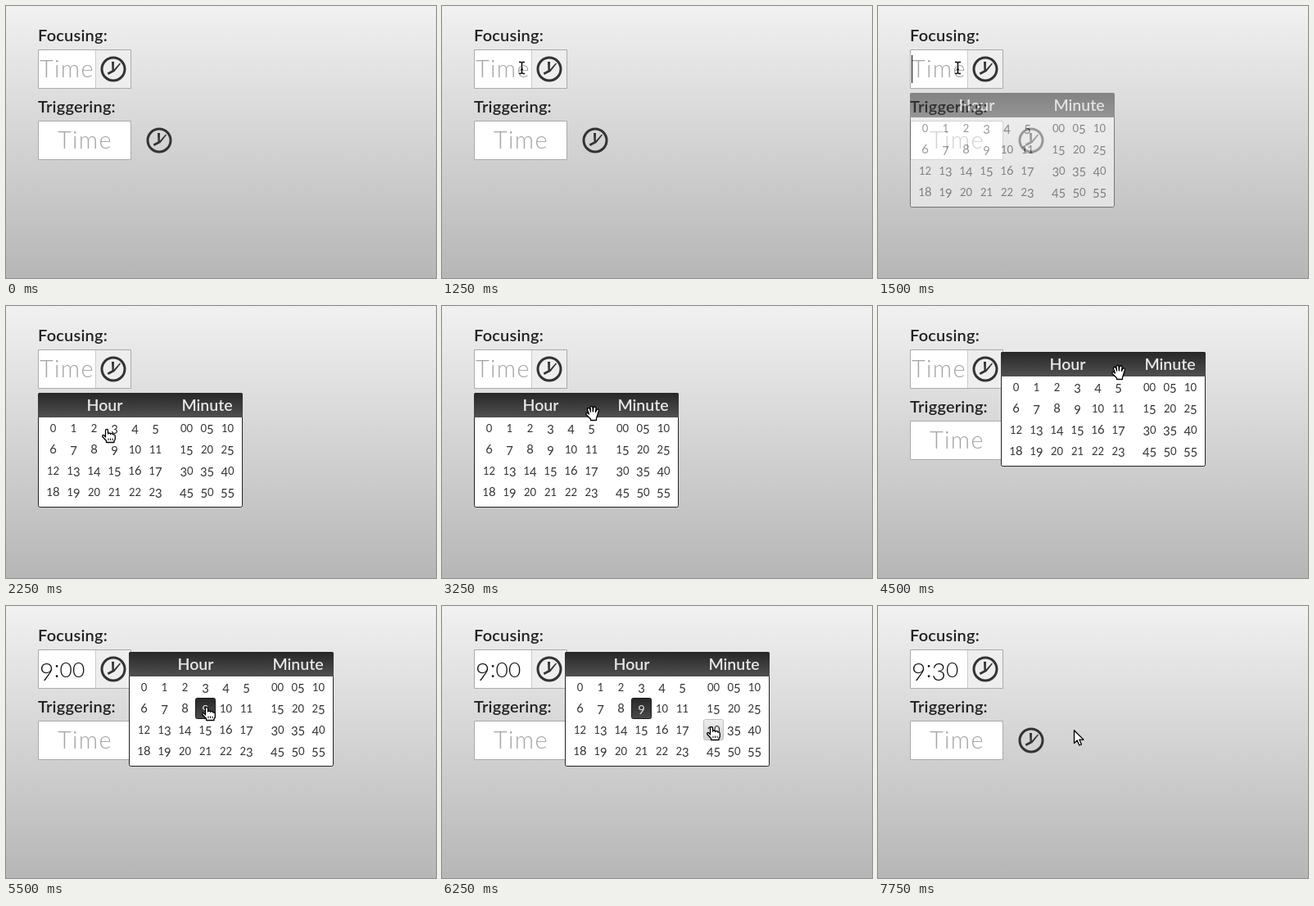
These frames come from a looping animation (525 by 332 pixels, 8000 ms). An HTML page with a canvas:

```html
<!DOCTYPE html>
<html lang="en">
<head>
<meta charset="utf-8">
<title>Time picker</title>
<style>
  html, body { margin: 0; width: 100%; height: 100%; overflow: hidden; }
  canvas { display: block; }
</style>
</head>
<body>
<canvas id="stage" width="525" height="332"></canvas>
<script>
const ctx = document.getElementById('stage').getContext('2d');
const LOOP = 8000;
const FONT = 'Lato, "Open Sans", sans-serif';

// Each row: start time, then the state that holds until the next row.
const CURSORS = [
  [0, null], [250, 'point', 213, 151], [500, 'arrow', 176, 89], [750, 'arrow', 134, 75],
  [1250, 'beam', 93, 67], [2250, 'point', 117, 150], [2500, 'point', 132, 199],
  [2750, 'point', 163, 147], [3000, 'open', 175, 122], [3750, 'closed', 222, 110],
  [4000, 'closed', 274, 79], [4250, 'closed', 288, 71], [4500, 'open', 285, 72],
  [4750, 'point', 270, 85], [5000, 'point', 242, 117], [5250, 'point', 239, 123],
  [5750, 'point', 299, 155], [6000, 'point', 315, 152], [6250, 'point', 323, 147],
  [7750, 'arrow', 239, 151]
];
const POPUPS = [
  [0, 0, 39, 106], [1500, .5, 39, 106], [1750, 1, 39, 106], [3750, .85, 84, 95],
  [4000, .85, 136, 64], [4250, .85, 150, 56], [4500, 1, 150, 56], [7000, 0, 150, 56]
];
const HOVERS = [
  [0, ''], [2500, 'h15'], [2750, 'h4'], [3000, ''], [5000, 'h9'], [5750, 'h17'], [6000, 'm30']
];
const VALUES = [[0, ''], [5500, '9:00'], [7000, '9:30']];
const CARET = [[0, false], [1500, true], [2250, false], [2750, true], [3250, false]];

const SHAPES = {
  arrow: new Path2D('M.5 .8V16.5L4.2 13 6.8 19 9.4 17.9 6.9 12.1H12Z'),
  point: new Path2D('M4.5 10V2Q4.5 .5 6 .5T7.5 2V6Q7.5 5 9 5T10.7 6.5Q10.7 5.5 12.2 5.7T13.8 7Q16.3 6.5 16.3 9V12Q16.3 13.5 15 14.5V16.5H5.5V14.5Q3 12 .8 9.5Q.3 7.5 2 7.5Q3.5 7.8 4.5 10Z'),
  open: new Path2D('M4.5 10L2.5 4.5Q2.3 2.5 4 2.5T6 5L6.5 7 6 2Q6 .5 7.5 .5T9 2L9.3 7 10 2Q10.5 .8 11.7 1T13 2.8L12.5 7.5 14 4.5Q15 3.5 16 4.3T16 7L14.5 12Q14 14 13.5 15.5V17.5H6.5V16Q4 13.5 1 10.5Q.2 8.5 2 8.5Q3 8.6 4.5 10Z'),
  closed: new Path2D('M3.5 7Q3 2 5 2Q6 2 6.2 2.7Q6.5 .7 8 .7T9.8 2Q10.5 1 11.7 1.3T13 3Q15.5 2.5 15.5 5.5V8.5Q15 10.5 14 12V14H5.5V12.5Q3 10 1 8Q.5 6.5 1.8 6.3Z'),
  beam: new Path2D('M1 1.5H3.3L4.5 2.5 5.7 1.5H8M1 15.5H3.3L4.5 14.5 5.7 15.5H8M4.5 2.5V14.5M3 10.5H6')
};
const FINGERS = new Path2D('M8 11.5V14M10.5 11.5V14M13 11.5V14');

const stateAt = (rows, time) => rows.findLast(row => row[0] <= time).slice(1);

function shade(y, height, top, bottom) {
  const gradient = ctx.createLinearGradient(0, y, 0, y + height);
  gradient.addColorStop(0, top);
  gradient.addColorStop(1, bottom);
  return gradient;
}

function box(x, y, w, h, fill, border, radius = 0) {
  ctx.beginPath();
  ctx.roundRect(x + .5, y + .5, w - 1, h - 1, radius);
  ctx.fillStyle = fill;
  ctx.fill();
  ctx.strokeStyle = border;
  ctx.lineWidth = 1;
  ctx.stroke();
}

function text(string, x, y, size, color, { weight = 400, align = 'left', spacing = 0 } = {}) {
  ctx.font = `${weight} ${size}px ${FONT}`;
  ctx.textAlign = align;
  ctx.letterSpacing = spacing + 'px';
  ctx.fillStyle = color;
  ctx.fillText(string, x, y);
  ctx.letterSpacing = '0px';
}

// Old-style figures: 0-2 are shorter, 3 4 5 7 9 hang below the baseline.
function figures(string, x, y, size, color, { weight = 400, centered = false } = {}) {
  const glyphs = [...string].map(char => {
    const scaled = '012'.includes(char) ? size * .88 : size;
    ctx.font = `${weight} ${scaled}px ${FONT}`;
    return { char, scaled, width: ctx.measureText(char).width, drop: '34579'.includes(char) ? size * .12 : 0 };
  });
  if (centered) x -= glyphs.reduce((sum, g) => sum + g.width, 0) / 2;
  for (const g of glyphs) {
    text(g.char, x, y + g.drop, g.scaled, color, { weight });
    x += g.width;
  }
}

function clock(x, y) {
  ctx.save();
  ctx.translate(x, y);
  ctx.strokeStyle = ctx.fillStyle = '#333';
  ctx.lineWidth = 3;
  ctx.beginPath();
  ctx.arc(0, 0, 14, 0, 7);
  ctx.stroke();
  ctx.fill(new Path2D('M-2 -9H1L.8 .5 8 -7.5 9 -6.5 1.5 3 -6 7 -7.3 4.5 -1.5 1.5Z'));
  ctx.restore();
}

function cell(id, label, x, y, hovered, selected) {
  const dark = id === selected;
  if (dark) box(x, y, 25, 26, shade(y, 26, '#272727', '#4c4c4c'), '#1a1a1a', 2);
  else if (id === hovered) box(x, y, 25, 26, shade(y, 26, '#eee', '#d2d2d2'), '#c0c0c0', 2);
  figures(label, x + 12.5, y + 18, 14.8, dark ? '#ddd' : '#333', { centered: true });
}

function popup(opacity, x, y, hovered, selected) {
  // Blended with a copy of the page so the panel fades as one layer.
  const page = opacity < 1 ? ctx.getImageData(x, y, 250, 140) : null;
  const heading = { weight: 600, align: 'center' };
  ctx.save();
  ctx.translate(x, y);
  box(0, 0, 250, 140, '#fff', '#222', 2);
  ctx.beginPath();
  ctx.roundRect(0, 0, 250, 30, [2, 2, 0, 0]);
  ctx.fillStyle = shade(0, 30, '#272727', '#505050');
  ctx.fill();
  text('Hour', 81.5, 22, 19.5, '#e8e8e8', heading);
  text('Minute', 206.5, 22, 19.5, '#e8e8e8', heading);
  for (let hour = 0; hour < 24; hour++) {
    cell('h' + hour, String(hour), 6 + hour % 6 * 25, 30 + Math.floor(hour / 6) * 26, hovered, selected);
  }
  for (let i = 0; i < 12; i++) {
    const label = String(i * 5).padStart(2, '0');
    cell('m' + label, label, 169 + i % 3 * 25, 30 + Math.floor(i / 3) * 26, hovered, selected);
  }
  ctx.restore();
  if (page) {
    const panel = ctx.getImageData(x, y, 250, 140);
    panel.data.forEach((value, i) => {
      panel.data[i] = value * opacity + page.data[i] * (1 - opacity);
    });
    ctx.putImageData(panel, x, y);
  }
}

function cursor(kind, x, y) {
  if (!kind) return;
  const shape = SHAPES[kind];
  ctx.save();
  ctx.translate(x, y);
  ctx.lineJoin = 'round';
  if (kind === 'beam') {
    ctx.strokeStyle = '#fff';
    ctx.lineWidth = 3;
    ctx.stroke(shape);
  } else {
    ctx.fillStyle = '#fff';
    ctx.fill(shape);
  }
  ctx.strokeStyle = '#000';
  ctx.lineWidth = kind === 'beam' ? 1.5 : 1.3;
  ctx.stroke(shape);
  ctx.lineWidth = 1;
  if (kind === 'point') ctx.stroke(FINGERS);
  ctx.restore();
}

function draw(time) {
  const [value] = stateAt(VALUES, time);
  const [hovered] = stateAt(HOVERS, time);
  const [caret] = stateAt(CARET, time);
  const [opacity, x, y] = stateAt(POPUPS, time);
  const label = { weight: 600, spacing: .2 };
  const placeholder = { weight: 300, spacing: 1.3 };

  ctx.fillStyle = shade(0, 332, '#f1f1f1', '#b6b6b6');
  ctx.fillRect(0, 0, 525, 332);

  text('Focusing:', 39, 43, 20, '#222', label);
  box(39, 53, 114, 48, '#fff', '#aaa');
  ctx.fillStyle = '#eee';
  ctx.fillRect(110, 54, 42, 46);
  ctx.fillStyle = '#ccc';
  ctx.fillRect(109, 54, 1, 46);
  if (value) figures(value, 41, 87, 30, '#111', { weight: 300 });
  else text('Time', 41, 87, 29, '#a4a4a4', placeholder);
  if (caret) {
    ctx.fillStyle = '#000';
    ctx.fillRect(41, 60, 1, 34);
  }
  clock(131, 77);

  text('Triggering:', 39, 130, 20, '#222', label);
  box(39, 140, 114, 48, '#fff', '#aaa');
  text('Time', 63, 174, 29, '#a4a4a4', placeholder);
  clock(187, 164);

  if (opacity) popup(opacity, x, y, hovered, value && 'h9');
  cursor(...stateAt(CURSORS, time));
}

function tick() {
  draw(performance.now() % LOOP);
  requestAnimationFrame(tick);
}
tick();
</script>
</body>
</html>
```
